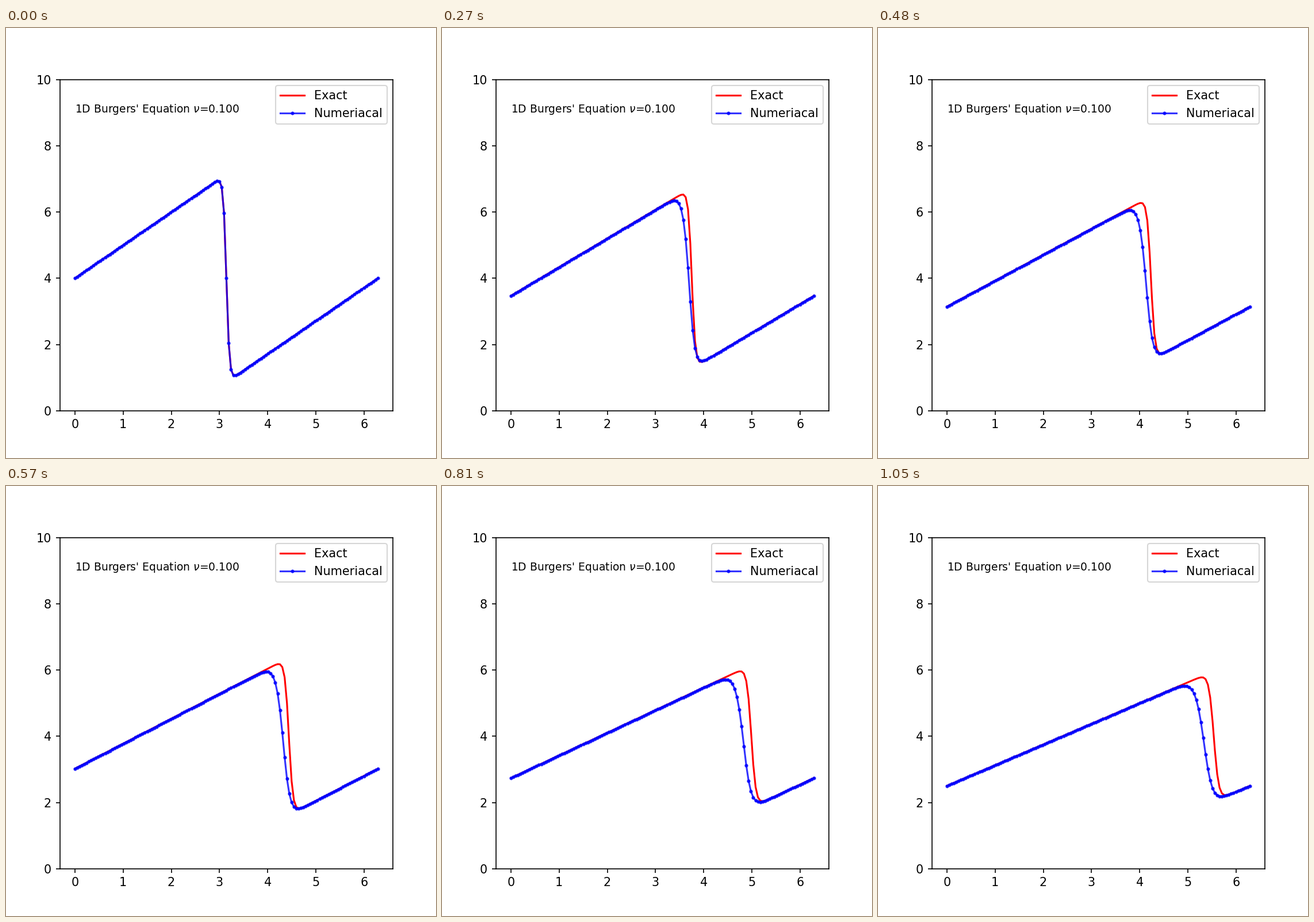
Animation, 748 px wide and 748 px high, one loop 1080 ms. Source, as a matplotlib script:

```python
import numpy as np
import matplotlib.pyplot as plt
from matplotlib.animation import FuncAnimation

NU = 0.1
CELLS = 130
FRAMES = 36
STEPS = 10          # solver steps per frame

dx = 2 * np.pi / CELLS
dt = 0.6 / 350
x = np.linspace(0, 2 * np.pi, CELLS + 1)


def exact(t):
    """Cole-Hopf solution of the periodic saw-tooth wave."""
    a = x - 4 * t
    b = a - 2 * np.pi
    spread = 4 * NU * (t + 1)
    ea, eb = np.exp(-a**2 / spread), np.exp(-b**2 / spread)
    slope = -2 * (a * ea + b * eb) / spread
    return 4 - 2 * NU * slope / (ea + eb)


def step(u):
    """Upwind convection, central diffusion, periodic ends."""
    left, right = np.roll(u, 1), np.roll(u, -1)
    return (u - u * dt / dx * (u - left)
            + NU * dt / dx**2 * (right - 2 * u + left))


def solve():
    u = exact(0)[:-1]
    rows = []
    for _ in range(FRAMES):
        rows.append(np.append(u, u[0]))
        for _ in range(STEPS):
            u = step(u)
    return rows


solution = solve()

fig, ax = plt.subplots(figsize=(5, 5), dpi=748 / 5)
true_line, = ax.plot(x, exact(0), "r-", lw=1.5, label="Exact")
num_line, = ax.plot(x, solution[0], "b.-", lw=1.5, ms=4, alpha=0.8,
                    label="Numeriacal")
ax.set_ylim(0, 10)
ax.text(0, 9, rf"1D Burgers' Equation $\nu$={NU:.3f}", fontsize=9)
ax.legend(loc="upper right")


def update(i):
    # the exact curve is taken at the start of the latest solver step
    true_line.set_ydata(exact(max(i * STEPS - 1, 0) * dt))
    num_line.set_ydata(solution[i])
    return true_line, num_line


anim = FuncAnimation(fig, update, frames=FRAMES, interval=30,
                     repeat=True, repeat_delay=0)
plt.show()
```
